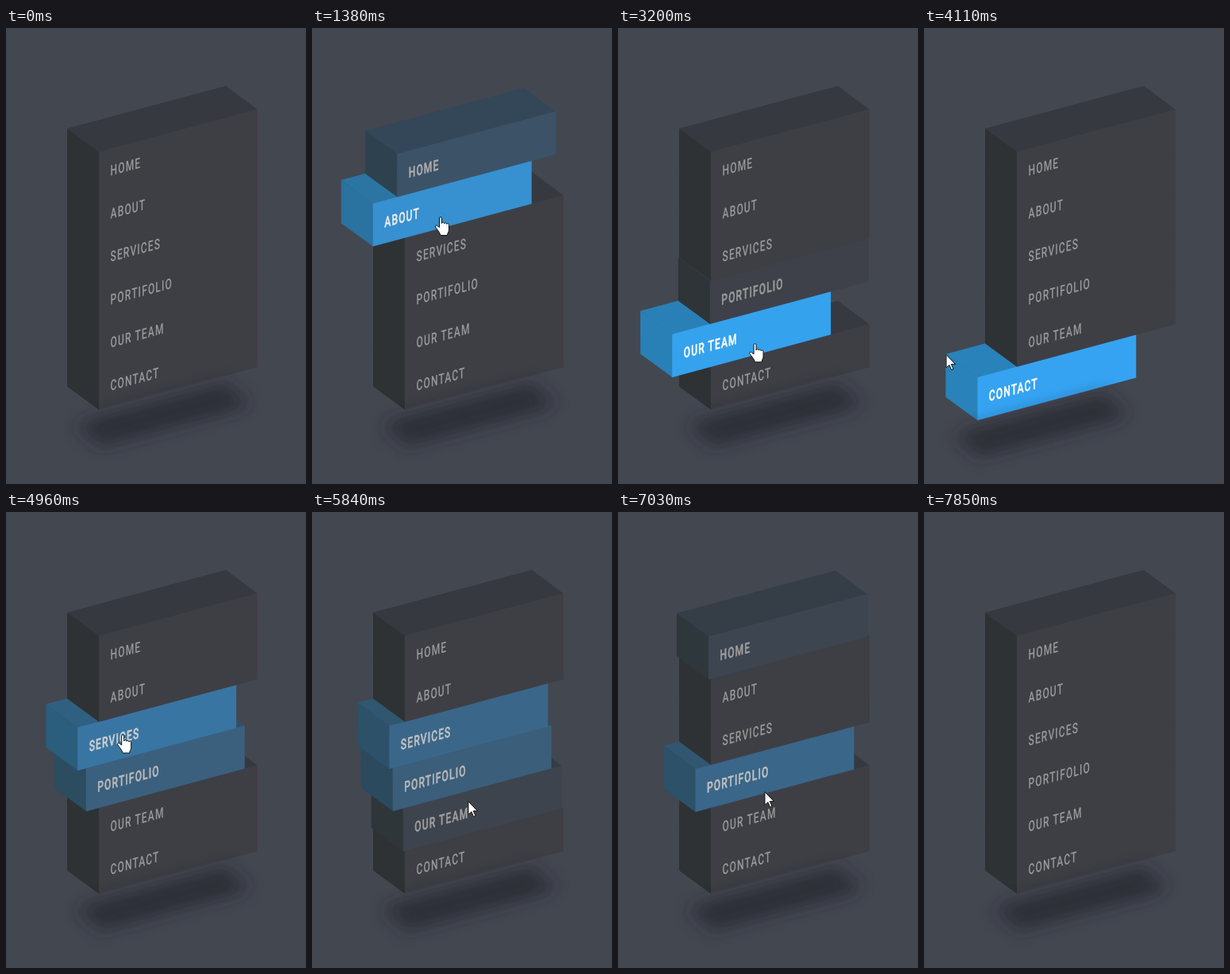
Animation, 378 px wide and 573 px high, one loop 8.31 s. Source, as an HTML page:

```html
<!DOCTYPE html>
<html lang="en">
<head>
<meta charset="utf-8">
<title>Isometric menu</title>
<style>
  html, body { margin: 0; width: 100%; height: 100%; overflow: hidden; background: #434750; }
  svg { display: block; width: 100%; height: 100%; }
  text { font: 500 18.3px Roboto, "Liberation Sans", sans-serif; letter-spacing: 1.7px; }
</style>
</head>
<body>
<svg viewBox="0 0 378 573">
  <filter id="blur" x="-30%" y="-80%" width="160%" height="260%"><feGaussianBlur stdDeviation="10"/></filter>
  <g id="menu" transform="translate(117 155.6) skewY(-15)"></g>
  <g id="cursor" fill="#fff" stroke="#111" stroke-linejoin="round">
    <path id="arrow" d="M0 0V16.5L4 13L6.5 19L9 18L6.3 12H11.5Z"/>
    <path id="hand" d="M-1.5 13V1.5a1.5 1.5 0 0 1 3 0V8c0-2 3.2-2 3.2.3c.3-1.6 3-1.4 3 .6c.5-1.4 2.8-1.2 2.8 1V16c0 3-2 4-2 7H0C-1 19-5 15-6.5 12.5C-7.5 10.5-5 9.5-3.5 11.5Z"/>
  </g>
</svg>
<script>
const LOOP = 8310, FADE = 500, SLIDE = 50;
const ROW = 54, LEFT = 117, TOP = 155.6, WIDTH = 200, DEPTH = 40;
const SLOPE = Math.tan(Math.PI / 12);
const labels = ['HOME', 'ABOUT', 'SERVICES', 'PORTIFOLIO', 'OUR TEAM', 'CONTACT'];

// Resting and hovered colours of each part
const colors = {
  front: [[62, 63, 69], [53, 164, 242]],
  left: [[46, 50, 52], [41, 130, 186]],
  top: [[54, 57, 64], [41, 130, 186]],
  text: [[153, 153, 153], [255, 255, 255]]
};

// Turning points of the pointer: time, x, height counted in menu rows
const path = [
  [140, 335, 8.8], [430, 316, .2], [1130, 165, 1], [1380, 162, 1.74], [1720, 165, 2],
  [2250, 178, 3], [2400, 182, 3.55], [2800, 180, 4], [3340, 170, 5], [3700, 120, 5.4],
  [4105, 28, 5], [4200, 28, 5], [4400, 80, 4.4], [5235, 180, 1.5], [5690, 190, 3],
  [5840, 197, 4.25], [6240, 190, 4], [6430, 185, .7], [6725, 185, 1], [6910, 185, 3],
  [7035, 185, 4], [7840, 330, 8.8]
];

const $ = id => document.getElementById(id);

function add(parent, tag, attrs) {
  const el = document.createElementNS('http://www.w3.org/2000/svg', tag);
  for (const key in attrs) el.setAttribute(key, attrs[key]);
  return parent.appendChild(el);
}

// Lower rows are painted first so that each row covers the one below
const rows = [];
for (let i = labels.length - 1; i >= 0; i--) {
  const g = add($('menu'), 'g', {});
  const face = points => add(g, 'polygon', { points });
  const row = {
    g,
    moves: [],
    top: face('0,.5 200,.5 160,-40 -40,-40'),
    left: face('.5,.5 -40,-40 -40,14.2 .5,54.5'),
    front: face('0,0 200,0 200,54.2 0,54.2')
  };
  if (i === labels.length - 1) {
    add(g, 'polygon', {
      points: '4,101 192,101 158,63 -30,63', fill: '#20232b', opacity: .66, filter: 'url(#blur)'
    });
  }
  row.text = add(g, 'text', { transform: 'translate(14.5 34) scale(.66 1)' });
  row.text.textContent = labels[i];
  rows[i] = row;
}

// The CSS "ease" curve
function ease(x) {
  if (x <= 0) return 0;
  if (x >= 1) return 1;
  let lo = 0, hi = 1, s;
  for (let n = 0; n < 24; n++) {
    s = (lo + hi) / 2;
    const at = .75 * s * (1 - s) + s * s * s;
    if (at < x) lo = s; else hi = s;
  }
  return .3 * s * (1 - s) ** 2 + 3 * s * s * (1 - s) + s ** 3;
}

const lastMove = (row, t) => row.moves.filter(m => m.start <= t).pop();

// How far a row is pulled out, from 0 to 1
function pull(row, t) {
  const move = lastMove(row, t);
  if (!move) return 0;
  const { start, from, to } = move;
  return from + (to - from) * ease((t - start) / (FADE * Math.abs(to - from)));
}

function pointer(t) {
  const n = path.findIndex(p => p[0] > t);
  if (n < 1) return null;
  const [t0, x0, r0] = path[n - 1], [t1, x1, r1] = path[n];
  const k = (t - t0) / (t1 - t0);
  return { x: x0 + (x1 - x0) * k, row: r0 + (r1 - r0) * k };
}

function rowUnder(t) {
  const p = pointer(t), row = p && rows[Math.floor(p.row)];
  if (!row || p.x > LEFT + WIDTH) return null;
  const edge = LEFT - DEPTH - (SLIDE - 1.5) * pull(row, t);
  return p.x > edge ? row : null;
}

// Follow the pointer once and note when each row starts to move
let hovered = null;
for (let t = 0; t < LOOP; t += 5) {
  const next = rowUnder(t);
  if (next === hovered) continue;
  if (hovered) hovered.moves.push({ start: t, from: pull(hovered, t), to: 0 });
  if (next) next.moves.push({ start: t, from: pull(next, t), to: 1 });
  hovered = next;
}

function mix([from, to], k) {
  return `rgb(${from.map((c, j) => Math.round(c + (to[j] - c) * k))})`;
}

function drawCursor(t) {
  const p = pointer(t);
  $('cursor').style.display = p ? '' : 'none';
  if (!p) return;
  const bend = Math.max(0, LEFT - SLIDE - p.x);
  const y = TOP + ROW * p.row - SLOPE * (p.x - LEFT) - bend;
  $('cursor').setAttribute('transform', `translate(${p.x} ${y})`);
  const linked = rows.some(row => lastMove(row, t)?.to === 1 && pull(row, t) > .45);
  $('hand').style.display = linked ? '' : 'none';
  $('arrow').style.display = linked ? 'none' : '';
}

function draw(t) {
  rows.forEach((row, i) => {
    const k = pull(row, t);
    row.g.setAttribute('transform', `translate(${-SLIDE * k} ${ROW * i})`);
    for (const part in colors) row[part].setAttribute('fill', mix(colors[part], k));
    // Moving labels look a little heavier
    row.text.setAttribute('stroke', k > .02 ? row.text.getAttribute('fill') : 'none');
    row.text.setAttribute('stroke-width', .5);
  });
  drawCursor(t);
}

const begin = performance.now();
function tick() {
  draw((performance.now() - begin) % LOOP);
  requestAnimationFrame(tick);
}
tick();
</script>
</body>
</html>
```
